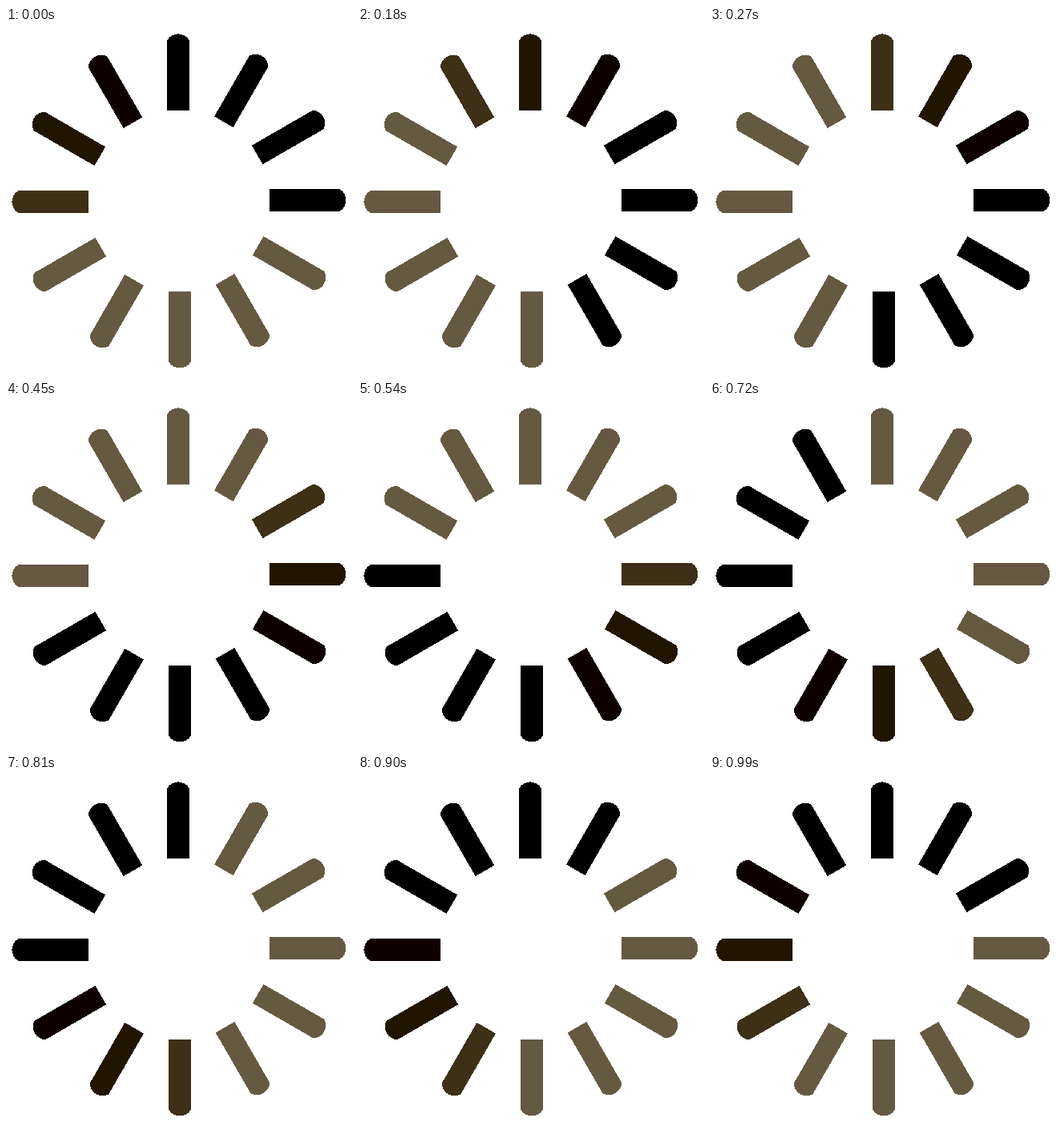
Animation, 432 px wide and 432 px high, one loop 1.08 s. Source, as an HTML page without scripts:

```html
<!DOCTYPE html>
<html lang="en">
<head>
<meta charset="utf-8">
<title>Loading spinner</title>
<style>
html, body { margin: 0; width: 100%; height: 100%; overflow: hidden; background: #fff; }
svg { display: block; width: 100%; height: 100%; }

/* Each spoke lights up one 90 ms step after its neighbour. */
use {
  transform: rotate(calc(var(--i) * 30deg));
  animation: fade 1080ms step-end calc((var(--i) - 15) * 90ms) infinite;
}

@keyframes fade {
  0% { fill: #000; }
  33.333% { fill: #0f0000; }
  41.666% { fill: #221500; }
  50% { fill: #3d3017; }
  58.333%, 100% { fill: #665942; }
}
</style>
</head>
<body>
<svg viewBox="-216 -216 432 432" shape-rendering="crispEdges">
  <defs>
    <path id="spoke" d="M-14.6-113.4V-201A16 16 0 0 1 12.6-201V-113.4Z"/>
  </defs>
  <use href="#spoke" style="--i:0"/>
  <use href="#spoke" style="--i:1"/>
  <use href="#spoke" style="--i:2"/>
  <use href="#spoke" style="--i:3"/>
  <use href="#spoke" style="--i:4"/>
  <use href="#spoke" style="--i:5"/>
  <use href="#spoke" style="--i:6"/>
  <use href="#spoke" style="--i:7"/>
  <use href="#spoke" style="--i:8"/>
  <use href="#spoke" style="--i:9"/>
  <use href="#spoke" style="--i:10"/>
  <use href="#spoke" style="--i:11"/>
</svg>
</body>
</html>
```
